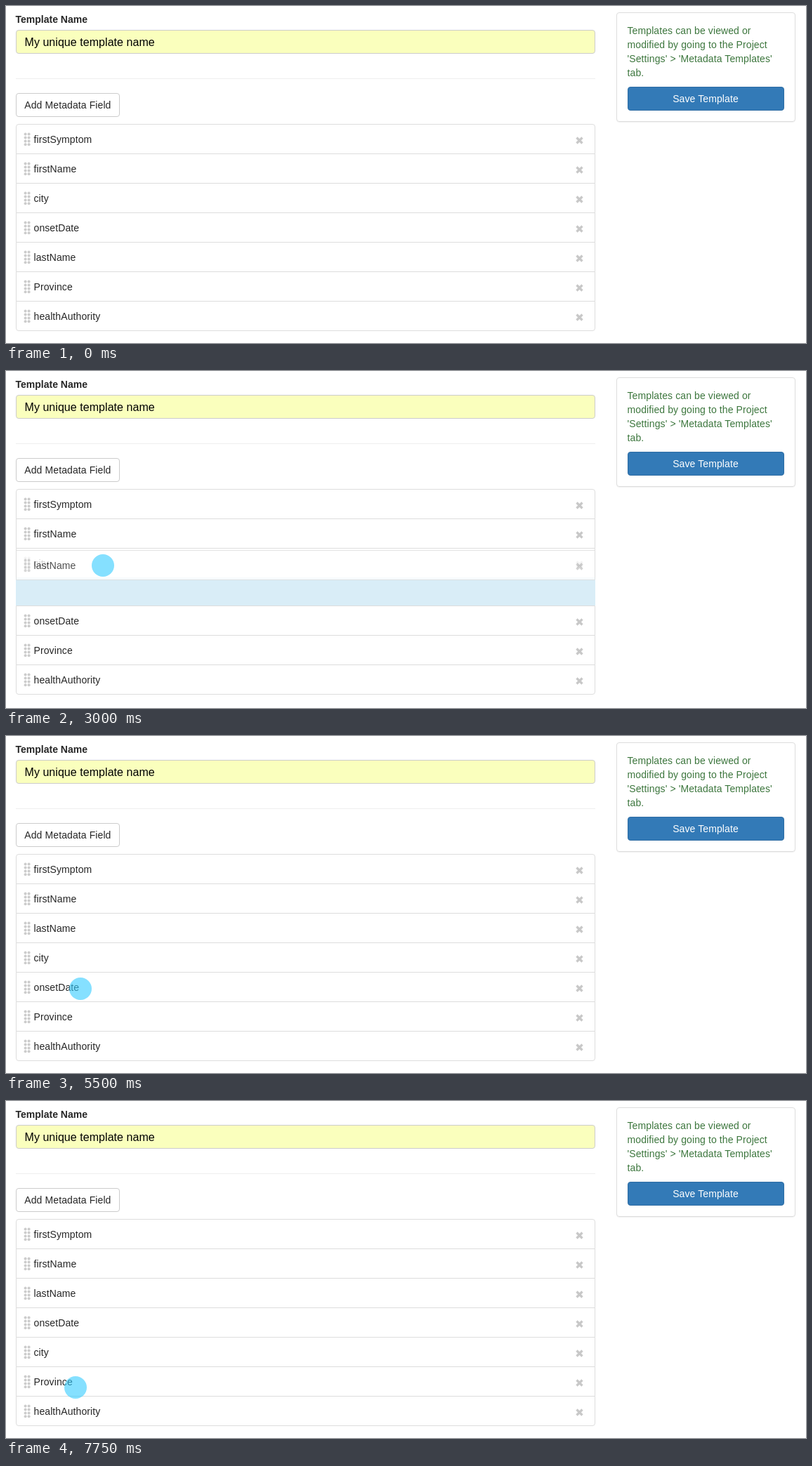
Recreate the animation shown at these times as an HTML page. Size 1139 px wide and 480 px high, loop 8 s.

```html
<!DOCTYPE html>
<html lang="en">
<head>
<meta charset="utf-8">
<title>Reordering template fields</title>
<style>
  html, body { margin: 0; width: 100%; height: 100%; overflow: hidden; background: #fff; }
  svg { display: block; width: 100%; height: 100%; }
  text {
    font: 14px "Liberation Sans", Arial, sans-serif;
    letter-spacing: .1px;
    fill: #262626;
    white-space: pre;
  }
  .label { font-weight: bold; letter-spacing: 0; }
  .input { font-size: 16px; letter-spacing: .05px; fill: #000; }
  .hint { fill: #3c763d; }
  .save { fill: #fff; text-anchor: middle; }
  .row path { fill: #fff; stroke: #ddd; }
  .row circle { fill: #ccc; }
  .row .remove { fill: none; stroke: #c8c8c8; stroke-width: 3.2; }
</style>
</head>
<body>
<svg id="stage" viewBox="0 0 1139 480">
  <text class="label" x="13.5" y="24">Template Name</text>
  <rect x="14.5" y="34.5" width="824" height="33" rx="3.5" fill="#faffbd" stroke="#ccc"/>
  <text class="input" x="26.5" y="57">My unique template name</text>
  <rect x="14" y="103" width="825" height="1" fill="#eee"/>
  <rect x="14.5" y="124.5" width="147" height="33" rx="3.5" fill="#fff" stroke="#ccc"/>
  <text x="26.3" y="146">Add Metadata Field</text>

  <rect x="869.5" y="10.5" width="254" height="155" rx="3.5" fill="none" stroke="#f2f2f2"/>
  <rect x="869.5" y="9.5" width="254" height="155" rx="3.5" fill="#fff" stroke="#ddd"/>
  <text class="hint" x="884.5" y="40">Templates can be viewed or</text>
  <text class="hint" x="884.5" y="60">modified by going to the Project</text>
  <text class="hint" x="884.5" y="80">'Settings' &gt; 'Metadata Templates'</text>
  <text class="hint" x="884.5" y="100">tab.</text>
  <rect x="885.5" y="115.5" width="222" height="33" rx="3.5" fill="#337ab7" stroke="#2e6da4"/>
  <text class="save" x="996" y="137">Save Template</text>

  <g id="list"></g>
  <rect id="slot" x="14" width="825" height="40" fill="#d9edf7"/>
  <g id="lifted"></g>
  <circle id="disc" r="16" fill="#3cf" fill-opacity=".6"/>
  <circle id="ring" r="19" fill="none" stroke="#3cf" stroke-opacity=".32" stroke-width="3"/>
</svg>
<script>
const LOOP = 8000, STEP = 250;
const LEFT = 14, TOP = 168, PITCH = 42, SLOT = 40;
const FIELDS = ['firstSymptom', 'firstName', 'city', 'onsetDate', 'lastName', 'Province', 'healthAuthority'];

// Each drag: field, start and drop time, list positions, point where it was grabbed
const DRAGS = [
  { name: 'lastName', start: 2000, end: 4000, from: 4, to: 2, x: 138, y: 358 },
  { name: 'city', start: 6500, end: 7500, from: 3, to: 4, x: 104, y: 304 }
];
const CLICKS = [1750, 6250];

// Pointer path: time, x, y
const PATH = [
  [250, 496, 430], [500, 320, 388], [750, 66, 334], [1250, 138, 358], [1750, 138, 358],
  [2000, 140, 353], [2250, 141, 343], [2750, 140, 312], [3000, 138, 277], [3250, 138, 260],
  [3500, 137, 251], [4000, 137, 255], [4250, 114, 294], [4500, 101, 348], [4750, 108, 412],
  [5000, 111, 433], [5250, 108, 402], [5750, 104, 318], [6000, 104, 305], [6250, 104, 321],
  [6500, 102, 326], [6750, 99, 350], [7000, 98, 376], [7250, 98, 376], [7500, 98, 387],
  [7750, 99, 408]
];

const get = id => document.getElementById(id);
const list = get('list'), lifted = get('lifted'), slot = get('slot');
const disc = get('disc'), ring = get('ring');

function add(parent, tag, attrs) {
  const el = document.createElementNS('http://www.w3.org/2000/svg', tag);
  for (const key in attrs) el.setAttribute(key, attrs[key]);
  return parent.appendChild(el);
}

// Row outline with separate top and bottom corner radii
function outline(a, b) {
  return `M.5 ${a + .5}q0 ${-a} ${a} ${-a}H${824.5 - a}q${a} 0 ${a} ${a}` +
    `V${42.5 - b}q0 ${b} ${-b} ${b}H${b + .5}q${-b} 0 ${-b} ${-b}Z`;
}

function makeRow(name, i) {
  const row = add(list, 'g', { class: 'row' });
  add(row, 'path', { d: outline(i === 0 ? 3.5 : 0, i === FIELDS.length - 1 ? 3.5 : 0) });
  for (let n = 0; n < 8; n++) {
    add(row, 'circle', { cx: 13.6 + n % 2 * 5, cy: 14.6 + (n >> 1) * 4.9, r: 2 });
  }
  add(row, 'text', { x: 25.5, y: 27 }).textContent = name;
  add(row, 'path', { class: 'remove', d: 'M798.5 19.5l8 8m0 -8l-8 8' });
  return row;
}

const rows = {};
FIELDS.forEach((name, i) => { rows[name] = makeRow(name, i); });

const move = (el, x, y) => el.setAttribute('transform', `translate(${x} ${y})`);
const show = (el, on) => el.setAttribute('visibility', on ? 'visible' : 'hidden');

function pointerAt(t) {
  const i = PATH.findIndex(p => p[0] >= t);
  if (i <= 0) return PATH[0].slice(1);
  const [t0, x0, y0] = PATH[i - 1], [t1, x1, y1] = PATH[i];
  const k = (t - t0) / (t1 - t0);
  return [x0 + (x1 - x0) * k, y0 + (y1 - y0) * k];
}

// The slot moves on when the pointer passes the middle of a neighbour
function slotIndex(from, y) {
  const middle = i => TOP + PITCH * (i + .5);
  let k = from;
  while (k > 0 && y < middle(k - 1)) k--;
  while (k < FIELDS.length - 1 && y > middle(k + 1) - 2) k++;
  return k;
}

function draw(time) {
  const t = Math.floor(time % LOOP / STEP) * STEP;
  const [x, y] = pointerAt(t);
  const order = FIELDS.slice();
  let drag = null;

  for (const d of DRAGS) {
    if (t < d.start) continue;
    order.splice(d.from, 1);
    if (t < d.end) drag = d;
    else order.splice(d.to, 0, d.name);
  }

  const gap = drag ? slotIndex(drag.from, y) : FIELDS.length;
  order.forEach((name, i) => {
    const row = rows[name];
    if (row.parentNode !== list) list.appendChild(row);
    row.removeAttribute('opacity');
    move(row, LEFT, TOP + PITCH * i + (i >= gap ? SLOT : 0));
  });

  show(slot, drag);
  if (drag) {
    const row = rows[drag.name];
    if (row.parentNode !== lifted) lifted.appendChild(row);
    row.setAttribute('opacity', .8);
    move(row, LEFT + x - drag.x, TOP + PITCH * drag.from + y - drag.y);
    slot.setAttribute('y', TOP + PITCH * gap);
  }

  const click = CLICKS.includes(t);
  move(disc, x, y);
  move(ring, x, y);
  show(disc, t >= PATH[0][0] && !click);
  show(ring, click);
}

const begin = performance.now();
function tick() {
  draw(performance.now() - begin);
  requestAnimationFrame(tick);
}
tick();
</script>
</body>
</html>
```
